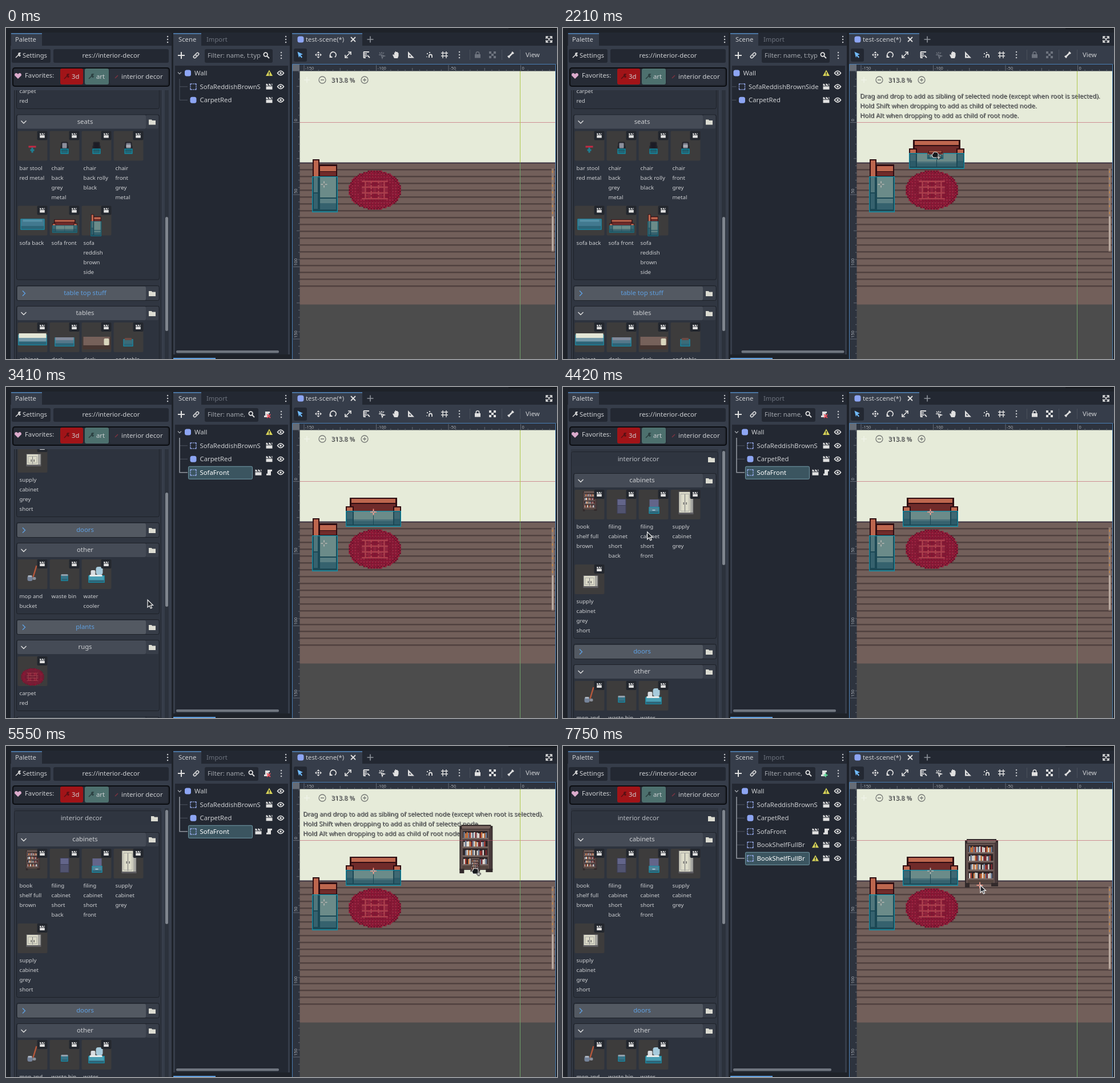
Animation, 965 px wide and 580 px high, one loop 8 s. Source, as an HTML page with a canvas:

```html
<!DOCTYPE html>
<html>
<head>
<meta charset="utf-8">
<style>
html, body { margin: 0; width: 100%; height: 100%; overflow: hidden; background: #1e2229; }
canvas { display: block; }
</style>
</head>
<body>
<canvas id="c" width="965" height="580"></canvas>
<script>
const g = document.getElementById('c').getContext('2d');
const BASE = '#363d4a', DARK = '#232832', EDGE = '#1e2229', TEXT = '#cdcfd2', DIM = '#6d737e',
  BLUE = '#5f9fe0', ICON = '#e0e0e0', NODE = '#8da5f3', WARN = '#d6d257';

function R(color, x, y, w, h, r = 0) {
  g.fillStyle = color;
  if (!r) return g.fillRect(x, y, w, h);
  g.beginPath(); g.roundRect(x, y, w, h, r); g.fill();
}
function frame(color, x, y, w, h, r = 0, lw = 1) {
  g.strokeStyle = color; g.lineWidth = lw;
  g.beginPath(); g.roundRect(x + lw / 2, y + lw / 2, w - lw, h - lw, r); g.stroke();
}
function T(s, x, y, color = TEXT, size = 11.3, align = 'left') {
  g.font = size + 'px "Noto Sans", sans-serif';
  g.textAlign = align; g.fillStyle = color;
  g.fillText(s, x, y + size * .36);
}
function shadowed(s, x, y) {
  T(s, x + 1, y + 1, 'rgba(0,0,0,.75)');
  T(s, x, y, '#85888a');
}
function at(x, y, draw, k = 1) {
  g.save(); g.translate(x, y); g.scale(k, k); draw(); g.restore();
}
function I(x, y, d, color = ICON, lw = 0) {
  at(x, y, () => {
    const p = new Path2D(d);
    if (lw) { g.strokeStyle = color; g.lineWidth = lw; g.stroke(p); }
    else { g.fillStyle = color; g.fill(p); }
  });
}

// Icons
const FOLDER = 'M-6-4h5l1 1.5h6v7.5h-12z', PLUS = 'M-6 0h12M0-6v12',
  CLAP = 'M-5.5-.5h11v5.5h-11zM-5.5-5h2l2 3h2l-2-3h3l2 3h2l-2-3h2v3.5h-11z',
  SCRIPT = 'M-3-5h8v3h-2v7h-8v-3h2z', ARROW = 'M-4.5-5.5L5-1L1 .5L4 4L2.5 5.5L-.5 2L-2 5z',
  POINTER = 'M0 0V13L3.2 10.2L5.4 15L7.6 14L5.4 9.4H9.5z', WRENCH = 'M-4 4L1-1M1-1Q0-5 4-4L2-2L4 0Q3 3 1-1',
  LOCK = 'M-5-1h1.5v-1.5a3.5 3.5 0 0 1 7 0V-1H5v6.5H-5zM-2-1h4v-1.5a2 2 0 0 0-4 0z',
  CORNERS = 'M-5-2v-3h3M2-5h3v3M5 2v3h-3M-2 5h-3v-3M-1-5h2M-1 5h2M-5-1v2M5-1v2';
const dots = (x, y) => [-5, 0, 5].forEach(d => R('#c3c6ca', x - 1.2, y + d - 1.2, 2.5, 2.5, 1.2));
const node = (x, y) => R(NODE, x - 5.5, y - 5.5, 11, 11, 3.5);
const warn = (x, y) => { I(x, y, 'M0-5.5L6 5H-6z', WARN); R(DARK, x - .7, y - 2, 1.5, 4); R(DARK, x - .7, y + 2.8, 1.5, 1.3); };
function eye(x, y) {
  I(x, y, 'M-5.5 0Q0-7.5 5.5 0Q0 7.5-5.5 0z', ICON, 1.6);
  R(ICON, x - 1.8, y - 1.8, 3.6, 3.6, 1.8);
}
const search = (x, y) => I(x, y, 'M1.5 1.5L5 5M2-1.5a3.3 3.3 0 1 1-6.6 0a3.3 3.3 0 1 1 6.6 0', ICON, 1.8);

// Furniture, in stage pixels with the origin at the top left
const noise = n => { const s = Math.sin(n * 12.9898) * 43758.5453; return s - Math.floor(s); };
function collision(x, y, w, h) {
  R('rgba(0,153,179,.42)', x, y, w, h);
  frame('#128fa9', x, y, w, h, 0, 1.2);
}
function sofa() {
  R('#2f0d12', 7, 0, 83, 26);
  R('#bd664e', 10, 2, 77, 7);
  R('#702b2a', 10, 11, 77, 13);
  R('#2f0d12', 0, 15, 97, 34);
  R('#702b2a', 14, 13, 69, 10);
  for (const x of [2, 85]) { R('#bd664e', x, 17, 10, 7); R('#6a4544', x, 25, 10, 12); R('#4b2f33', x, 37, 10, 10); }
  for (const x of [14, 49]) { R('#b8816a', x, 24, 34, 14); R('#7d5450', x, 38, 34, 3); R('#5c3a3c', x, 41, 34, 6); }
  collision(0, 23, 97, 28);
}
function sideSofa() {
  R('#2f0d12', 1, 0, 12, 91);
  R('#bd664e', 3, 2, 8, 28);
  R('#8a5c54', 3, 30, 7, 28); R('#5c3a3c', 3, 60, 7, 27);
  R('#2f0d12', 12, 9, 32, 82);
  R('#bd664e', 14, 12, 28, 9);
  R('#702b2a', 14, 22, 28, 7);
  R('#b8816a', 14, 30, 28, 37);
  R('#9a6c60', 14, 69, 28, 8); R('#5c3a3c', 14, 77, 28, 11);
  collision(0, 30, 45, 63);
}
function carpet() {
  const p = 2.53;
  for (let j = -13; j <= 13; j++) for (let i = -18; i < 18; i++) {
    const u = Math.abs(i + .5), v = Math.abs(j), d = Math.hypot(u / 18, v / 13.4), odd = (i + j) & 1;
    if (d > 1.01) continue;
    let c = odd ? '#8a1433' : '#7f1130';
    if (d > .9) c = odd ? '#9c1738' : '#6c0f2a';
    else if (d > .66) c = odd && v % 2 ? '#9f2140' : '#861332';
    else if (u < 9 && v < 7) {
      const wave = Math.cos(u * .75) * Math.cos(v * .8);
      c = Math.abs(wave) < .25 ? '#b03c4c' : wave > .5 ? '#93203c' : '#851332';
    }
    R(c, i * p, j * p - p / 2, p + .1, p + .1);
  }
}
function shelf() {
  const tint = ['#a63d32', '#d8d5cf', '#c9763f', '#6d7d96', '#7c2a30', '#e3e0da'];
  R('#322a2b', 1, 2, 58, 77); R('#322a2b', 4, 0, 52, 4);
  R('#786560', 5, 2, 50, 5);
  R('#62504d', 3, 8, 50, 70); R('#47393a', 53, 6, 5, 72);
  for (let r = 0; r < 4; r++) {
    const y = 11 + r * 15.3;
    R('#2b2224', 7, y, 43, 12);
    for (let b = 0; b < 16; b++) {
      const n = noise(r * 31 + b + 3), gap = noise(b + r) * 2.5;
      if (n > .12) R(tint[Math.floor(n * 6)], 8 + b * 2.55, y + 1.5 + gap, 2.55, 10.5 - gap);
    }
    R('#80706a', 6, y + 12, 45, 1.6);
  }
  R('#54453f', 6, 72, 45, 5);
  R('#322a2b', 1, 77, 8, 8); R('#322a2b', 47, 77, 12, 6);
}
function cabinet(h) {
  R('#5f5e63', -13, -h / 2, 26, h); R('#dcdbc9', -12, -h / 2 + 1, 20, h - 4);
  R('#a9a9a4', 8, -h / 2 + 1, 4, h - 4); R('#77777a', -2.5, -h / 2 + 4, 1, h - 8);
  frame('#a9a9a4', -10, -h / 2 + 4, 16, h - 9);
  R('#666', -5, -1, 1.5, 4); R('#666', 0, -1, 1.5, 4);
}
function chair(c) {
  R('#22232a', -6, -7, 12, 15, 2); R(c, -4, -5, 8, 9, 1);
  R('#22232a', -7, 0, 2, 9); R('#22232a', 5, 0, 2, 9);
  R('#3a3c46', -4, 8, 8, 5);
  collision(-7, 5, 14, 9);
}
const teal = (x, y, w, h, c = '#4f8498') => { R(c, x, y, w, h); R('#2d6477', x, y + h * .65, w, h * .35); frame('#128fa9', x, y, w, h); };

// Thumbnails, with the origin at the cell centre
const thumbs = {
  'book|shelf full|brown': () => at(-12, -24, shelf, .42),
  'filing|cabinet|short|back': () => { R('#3d3f58', -8, -10, 16, 26); R('#63658a', -7, -9, 14, 10); R('#51536f', -7, 2, 14, 13); },
  'filing|cabinet|short|front': () => { R('#63658a', -7, -9, 16, 13); teal(-8, 4, 18, 12); R('#bcd', -2, 9, 5, 1.5); },
  'supply|cabinet|grey': () => at(1, -3, () => cabinet(40)),
  'supply|cabinet|grey|short': () => at(2, 4, () => cabinet(22)),
  'mop and|bucket': () => { I(0, 0, 'M1 5L7-15', '#b5583c', 2.5); R('#75839a', -9, 3, 9, 9, 3); R('#aab4c0', -8, 2, 7, 3, 1); R('#8a8f99', 0, 5, 6, 5, 2); },
  'waste bin': () => { teal(-6, 1, 12, 11, '#3a7387'); R('#93a0ab', -6, 0, 12, 3, 1); },
  'water|cooler': () => { teal(-14, 2, 28, 13, '#4a9fb4'); R('#d9dde0', -10, -7, 8, 10, 2); R('#a7cbdc', -1, -13, 12, 14, 4); R('#e8ecec', -12, 1, 22, 3); },
  'carpet|red': () => at(0, 10, carpet, .44),
  'bar stool|red metal': () => { R('#c32a44', -7, 0, 13, 3); R('#1f7f92', -2, 3, 3, 9); R('#1f7f92', -4, 6, 7, 3); },
  'chair|back|grey|metal': () => chair('#8c8f9b'),
  'chair|back rolly|black': () => chair('#1c1c26'),
  'chair|front|grey|metal': () => { chair('#777a86'); R('#a7aab4', -4, -2, 8, 5); },
  'sofa back': () => { teal(-21, -3, 42, 19, '#42798f'); R('#5590a6', -17, -2, 34, 4); },
  'sofa front': () => at(-21.5, -2, sofa, .45),
  'sofa|reddish|brown|side': () => at(-10, -11, sideSofa, .41),
  'cabinet': () => { teal(-25, -5, 50, 19, '#7398a8'); R('#e4e6d6', -24, -7, 48, 8); },
  'desk': () => { teal(-17, 0, 34, 16, '#55788a'); R('#81899a', -16, 0, 32, 5); },
  'desk ': () => { R('#463632', -24, -1, 49, 22); R('#76615a', -23, -1, 46, 15); R('#dad6bd', 13, 2, 9, 12, 2); },
  'end table': () => { teal(-9, 3, 17, 13, '#3b6b78'); R('#6a4a44', -7, 1, 13, 4, 2); }
};
const names = Object.keys(thumbs);
const sections = [
  ['cabinets', 163, names.slice(0, 5)], ['doors', 463], ['other', 498, names.slice(5, 8)],
  ['plants', 633], ['rugs', 668, names.slice(8, 9)], ['seats', 802.5, names.slice(9, 16)],
  ['table top stuff', 1103], ['tables', 1138, names.slice(16)]
];

function section([name, y, items]) {
  if (items) {
    const last = 82 + 131 * Math.floor((items.length - 1) / 4);
    const lines = Math.max(...items.slice(items.length > 4 ? 4 : 0).map(s => s.split('|').length));
    const h = last + lines * 17 + 9;
    R('#2d333e', 18, y - 12, 251, h, 3); frame('#1d2128', 18, y - 12, 251, h, 3);
  } else frame('#1d2128', 18, y - 13, 251, 27, 3);
  R(items ? '#454b56' : '#535962', 20, y - 11, 225, 24, 2);
  R('#383e49', 245, y - 11, 22, 24, 2);
  I(31, y + 1, items ? 'M-4.5-2L0 2.5L4.5-2' : 'M-2-4.5L2.5 0L-2 4.5', items ? ICON : BLUE, 1.4);
  I(256, y + 1, FOLDER, '#dcdcd2');
  T(name, 138.5, y, items ? TEXT : BLUE, 11.3, 'center');
  (items || []).forEach((s, i) => {
    const x = 20.5 + i % 4 * 56, top = y + 17 + Math.floor(i / 4) * 131;
    R('#3d3c3c', x, top, 52, 52, 2);
    at(x + 26, top + 26, thumbs[s]);
    R('#23272e', x + 34, top, 18, 16, 2);
    at(x + 43, top + 8, () => I(0, 0, CLAP), .78);
    s.split('|').forEach((w, n) => T(w, x + 3, top + 65 + n * 17, TEXT, 9.7));
  });
}

function tab(s, x, w, tx) {
  R(BASE, x, 10, w, 22); R('#5284b8', x, 9, w, 1.6);
  T(s, tx, 20);
}

function palette(scroll) {
  tab('Palette', 9, 54, 16);
  dots(283, 20);
  R(BASE, 8, 31, 282, 549);
  R(DARK, 10, 37, 68, 24, 3); I(21, 48, WRENCH, ICON, 1.4); T('Settings', 29, 48);
  R(DARK, 83, 37, 202, 24, 3); T('res://interior-decor', 184, 48, TEXT, 11.3, 'center');
  R('#262b35', 11, 69, 276, 34, 4); frame('#0b0d11', 11, 69, 276, 34, 4, 2);
  I(21, 84, 'M0 5L-6-1Q-6-5-3-5Q-1-5 0-3Q1-5 3-5Q6-5 6-1z', '#dcaccd');
  T('Favorites:', 33, 83);
  R('#a11418', 95, 71, 40, 28, 3); I(106, 85, WRENCH, '#5a1014', 1.6); T('3d', 115, 85);
  R('#4d706e', 138, 71, 42, 28, 3); I(149, 85, WRENCH, '#2b3f40', 1.6); T('art', 158, 85);
  R('#2b303b', 182, 71, 101, 28, 3); I(194, 85, 'M-3 3L2-2', '#7b3340', 1.6); T('interior decor', 202, 85);

  g.save();
  g.beginPath(); g.rect(8, 109, 282, 471); g.clip();
  R('#303641', 14, 109, 258, 471);
  g.translate(0, -scroll);
  frame('#20242c', 14, 113, 258, 1300, 3);
  R('#2f3540', 15, 114, 256, 25, 3);
  T('interior decor', 132, 126, '#b9bdc3', 11.3, 'center');
  I(260, 127, FOLDER, '#dcdcd2');
  sections.forEach(section);
  g.restore();
  R('#2c323c', 278, 109, 7, 471);
  R('#7f858e', 279, 112 + scroll * .3427, 5, 200, 2.5);
}

function sceneDock(s) {
  tab('Scene', 293, 49, 302);
  T('Import', 351, 20, DIM);
  dots(490, 20);
  R(BASE, 293, 31, 204, 541);
  I(307, 48, PLUS, ICON, 2);
  I(333, 48, 'M-1 1L1-1M-1.5-1.5L1-4a2 2 0 0 1 3 3L1.5 1.5M1.5 1.5L-1 4a2 2 0 0 1-3-3L-1.5-1.5', ICON, 1.6);
  const fw = s.sel ? 94 : 119;
  R(DARK, 348, 37, fw, 24, 3);
  T(s.sel ? 'Filter: name,' : 'Filter: name, t:typ', 353, 48, '#a4a8ae');
  search(s.sel ? 430 : 456, 48);
  if (s.sel) {
    I(457, 48, SCRIPT);
    s.sel === 3 ? I(460, 51, 'M-3-3L3 3M-3 3L3-3', '#f0525e', 1.8) : I(460, 51, 'M-3.5 0h7M0-3.5v7', '#5fe09a', 1.8);
  }
  dots(482, 48);
  R(DARK, 296, 66, 198, 506);

  const rows = ['SofaReddishBrown' + (s.shift ? 'Side' : 'S'), 'CarpetRed', 'SofaFront', 'BookShelfFullBr', 'BookShelfFullBr'].slice(0, s.rows);
  const rowY = i => 79.3 + i * 23.5;
  g.save();
  g.beginPath(); g.rect(296, 66, 198, 506); g.clip();
  g.translate(-s.shift, 0);
  I(304, 79, 'M-3-1.5L0 1.5L3-1.5', '#9da1a8', 1.3);
  node(318.5, 79);
  T('Wall', 330, 79);
  rows.forEach((n, i) => {
    const y = rowY(i + 1);
    I(304, y, 'M0 0h14', '#4d535e', 1);
    if (s.sel === i + 1) {
      R('#3b5560', 319, y - 11, 113, 23, 2); frame('#7096a3', 319, y - 11, 113, 23, 2);
    }
    i === 1 ? node(328, y) : I(328, y, CORNERS, '#9db1f5', 1.3);
    T(n, 339.5, y, s.sel === i + 1 ? '#fff' : TEXT);
  });
  R('#4d535e', 303.5, 89, 1, rowY(rows.length) - 89);
  if (s.sel) I(304, 89, `M0 0V${rowY(s.sel) - 89}H14`, '#8d929a', 1.6);
  g.restore();

  warn(461, 79); eye(481, 79);
  rows.forEach((n, i) => {
    const y = rowY(i + 1);
    eye(481, y);
    if (i === 2) { I(442, y, CLAP); I(461, y, SCRIPT); }
    else I(461, y, CLAP);
    if (i > 2) warn(442, y);
  });
  R('#6f757f', 298 + s.shift, 565, s.rows > 3 ? 172 : 180, 4.5, 2);
  R(BLUE, 293, 578, 74, 2);
}

function toolbar(s) {
  tab('test-scene(*)', 501, 123, 525);
  node(516, 20);
  I(608, 20, 'M-4-4L4 4M-4 4L4-4', ICON, 1.8);
  I(638, 20, 'M-5.5 0h11M0-5.5v11', '#8e939b', 1.6);
  I(951, 20, 'M-5-1v-4h4M1-5h4v4M5 1v4h-4M-1 5h-4v-4M-5-5L5 5M5-5L-5 5', ICON, 1.6);
  R(BASE, 501, 31, 464, 33);
  R(DARK, 504, 36, 23, 23, 3);
  I(515, 47, ARROW, '#70bafa');
  I(547, 47, 'M0-6l2.5 3h-5zM0 6l2.5-3h-5zM-6 0l3-2.5v5zM6 0l-3-2.5v5zM-1.5-1.5h3v3h-3z');
  I(573, 47, 'M-4 3A5 5 0 1 1 3 4M-5.5 0v4h4', ICON, 1.8);
  I(599, 47, 'M-4 4L4-4M0-5h5v5M-5 0v5h5', ICON, 1.7);
  I(631, 47, 'M-5-5h10M-5-1.5h6M-5 2h6M-5 5h4M-4.5-5v10M2 1l4 4', ICON, 1.8);
  const c = s.sel ? ICON : DIM;
  I(658, 47, 'M0-5v3M-5 0h3M-4-4l2 2M4-4l-2 2M-1 0l6 2l-3 1l-1 3z', c, 1.5);
  I(683, 47, 'M-3 6L-6 0L-4-1L-3 1V-4H-1.5V-6H0V-5H1.5V-5H3V-3.5H4.5V2L3 6z');
  I(709, 47, 'M-5-6L6 5.5H-5zM-2.5-.5V3H1z');
  I(742, 47, 'M-4-3v2M0-5v2M-5 3v1M-1 5V2a2.5 2.5 0 0 1 5 0v3', ICON, 1.8);
  I(768, 47, 'M-6-3H6M-6 2H6M-3-6V6M3-6V6', ICON, 1.4);
  dots(794, 47);
  [812, 868, 900].forEach(x => R('#4a505c', x, 38, 1, 18));
  I(826, 47, LOCK, c);
  I(852, 47, 'M-6-6h4v4h-4zM2-6h4v4h-4zM-6 2h4v4h-4zM2 2h4v4h-4zM-2-2h4v4h-4z', c);
  I(884, 47, 'M-4 4L4-4M-5 2l3 3M2-5l3 3', ICON, 2.6);
  T('View', 910, 47);
}

function cross(x, y, hot) {
  I(x, y, 'M-5.5 0h4M1.5 0h4M0-5.5v4M0 1.5v4', hot ? '#ff9a88' : '#b9b9b4', 1.6);
  frame(hot ? '#ffb4a6' : '#7e8481', x - 2, y - 2, 4, 4, 1);
}

function viewport(s) {
  g.save();
  g.beginPath(); g.rect(514, 75, 449, 505); g.clip();
  R('#e6ebd9', 514, 75, 449, 162);
  R('#725f5a', 514, 237, 449, 248);
  R('#3c3241', 514, 235.5, 449, 2);
  for (let i = 0; i < 18; i++) R('#50413f', 514, Math.round(247 + i * 12), 449, 2.5);
  R('#4c4c4c', 514, 484.5, 449, 96);
  R('#8f7c73', 955.5, 246, 4, 146);
  for (let y = 250; y < 390; y += 12) R('#c98745', 956.5, y, 1.5, 4);
  R('#b9aaa0', 956, 330, 3, 60);

  at(536, 230, sideSofa);
  at(646, 284, carpet);
  if (s.rows > 2) at(595, 194, sofa);
  if (s.rows > 3) at(703, 163, shelf);
  cross(557, 274);
  if (s.rows > 2) cross(643.5, 219, s.sel === 3);
  if (s.rows > 3) cross(730, 244, true);

  if (s.over) {
    shadowed('Drag and drop to add as sibling of selected node (except when root is selected).', 520, 119);
    shadowed('Hold Shift when dropping to add as child of selected node.', 520, 136);
    shadowed('Hold Alt when dropping to add as child of root node.', 520, 153);
    if (s.drag === 1) at(s.x - 46, s.y - 26, sofa);
    else at(s.x - 28.5, s.y - 81, shelf);
  }
  R('rgba(190,80,100,.6)', 514, 165, 449, 1);
  R('#b0c850', 900, 75, 1, 161);
  R('#6fa06b', 900, 237, 1, 343);

  I(527, 91, 'M-5 0h10M0-5v10', 'rgba(255,255,255,.4)', 1.5);
  for (const x of [554, 628]) I(x, 91, 'M6 0a6 6 0 1 1-12 0a6 6 0 1 1 12 0M-3 0h6' + (x > 600 ? 'M0-3v6' : ''), '#777a77', 1.3);
  shadowed('313.8 %', 569.5, 91);
  g.restore();

  // Rulers
  R('#2d333e', 501, 64, 462, 11.5); R('#2d333e', 501, 64, 13.5, 516);
  const step = 12.65, tick = '#656b76';
  for (let n = -30; n < 5; n++) {
    const x = 901 + n * step, big = n % 10 === 0;
    if (x > 515) R(tick, x, big ? 65 : n % 5 ? 73 : 70, 1, big ? 10.5 : n % 5 ? 2.5 : 5.5);
    if (big) T(String(n * 5), x + 2.5, 70, '#a9adb3', 7.5);
  }
  for (let n = -7; n < 33; n++) {
    const y = 165 + n * step, big = n % 10 === 0;
    R(tick, big ? 503 : n % 5 ? 512 : 509, y, big ? 11.5 : n % 5 ? 2.5 : 5.5, 1);
    if (big) at(507.5, y - 1.5, () => { g.rotate(-Math.PI / 2); T(String(n * 5), 0, 0, '#a9adb3', 7.5); });
  }
  R('#666c76', 502, 64, 12, 11.5);
  frame('#4a7fb5', 501, 63, 462, 530);
  R(EDGE, 963, 64, 2, 516);
}

// Pointer path: time, x, y
const path = [
  [0, 103, 348], [1190, 103, 348], [1500, 330, 330], [1980, 660, 245], [2210, 652, 222], [2490, 641, 220],
  [2720, 641, 220], [3100, 248, 373], [3660, 248, 373], [3720, 268, 380], [4220, 268, 380], [4420, 148, 254],
  [4700, 46, 205], [5000, 46, 205], [5230, 330, 264], [5360, 540, 262], [5550, 822, 219], [5820, 777, 239],
  [6270, 721, 247], [6400, 721, 247], [6980, 731, 244], [8000, 731, 244]
];
function pointer(t) {
  const i = path.findIndex(p => p[0] > t), a = path[i - 1], b = path[i], k = (t - a[0]) / (b[0] - a[0]);
  return [a[1] + (b[1] - a[1]) * k, a[2] + (b[2] - a[2]) * k];
}
function cursor(s) {
  const { x, y } = s;
  if (!s.drag) {
    I(x, y, POINTER, '#20242a');
    return I(x, y, POINTER, '#f2f2f2', 1.2);
  }
  if (s.drag === 1) at(x - 14, y - 7, sofa, .29);
  else at(x - 8.5, y - 23, shelf, .285);
  const fist = 'M-4 5L-6 0Q-5-2-4-1Q-4-5-2-4Q0-6 1-4Q3-5 4-3Q6-3 5 1L3 5z';
  I(x, y, fist, '#17191d'); I(x, y, fist, '#f2f2f2', 1);
  I(x + 6, y + 5, 'M-4 0h8M0-4v8', '#111', 3); I(x + 6, y + 5, 'M-3.5 0h7M0-3.5v7', '#fff', 1.2);
}

const clicks = (t, start, gap, n) => 71 * Math.min(n, Math.max(0, Math.ceil((t - start) / gap)));
function draw(now) {
  const t = now % 8000, [x, y] = pointer(t);
  const drag = t >= 670 && t < 2680 ? 1 : t >= 5030 && t < 7220 ? 2 : 0;
  const rows = t < 2680 ? 2 : t < 7220 ? 3 : t < 7750 ? 4 : 5;
  const s = { x, y, drag, rows, sel: rows > 2 ? rows : 0, over: drag && x > 514, shift: t > 1450 && t < 2680 ? 14.5 : 0 };
  R(EDGE, 0, 0, 965, 580);
  R(DARK, 8, 8, 282, 23); R(DARK, 293, 8, 204, 23); R(DARK, 501, 8, 464, 23);
  R('#14171c', 880, 0, 85, 2);
  palette(639 - clicks(t, 3100, 50, 6) - clicks(t, 4000, 70, 3));
  sceneDock(s);
  toolbar(s);
  viewport(s);
  if (t >= 670) cursor(s);
  requestAnimationFrame(draw);
}
requestAnimationFrame(draw);
</script>
</body>
</html>
```
